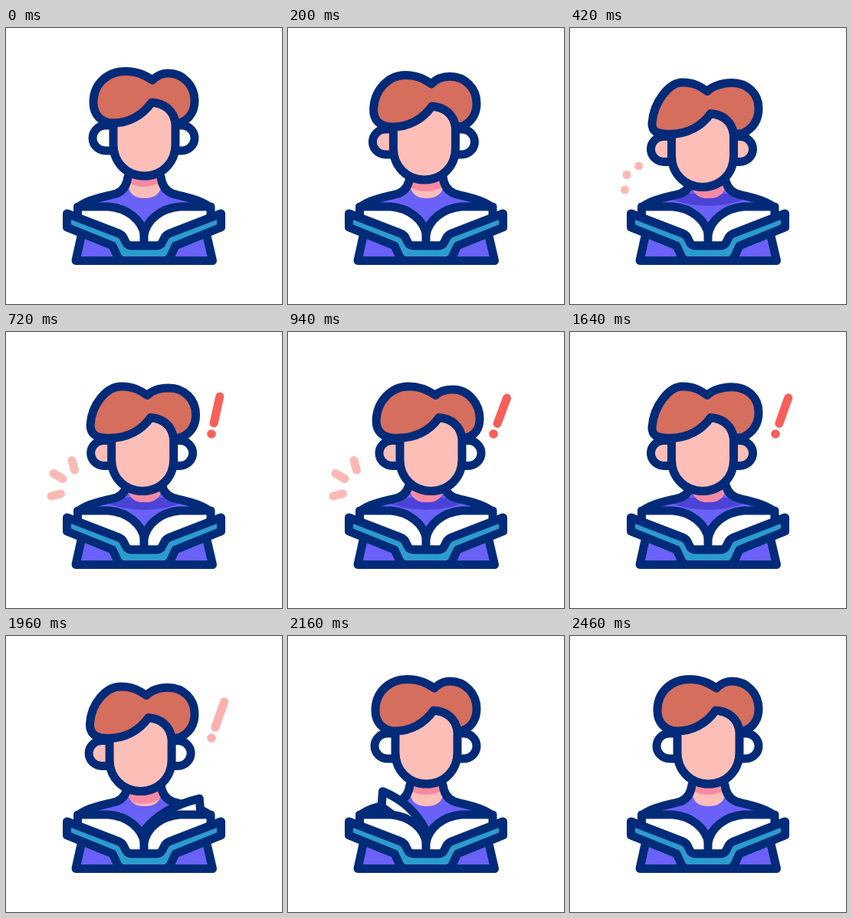
An HTML page that plays this animation: 360x360 px, repeating every 2.92 s.

```html
<!DOCTYPE html>
<html lang="en">
<head>
<meta charset="utf-8">
<title>Reader</title>
<style>
html, body { margin: 0; width: 100%; height: 100%; overflow: hidden; background: #fff; }
svg { display: block; width: 100vw; height: 100vh; }
.ink { stroke: #012b78; stroke-width: 11; stroke-linecap: round; stroke-linejoin: round; }
.line { fill: none; }
.skin { fill: #fdbeb8; }
.mark { stroke: #f85f59; stroke-width: 11; stroke-linecap: round; }
</style>
</head>
<body>
<svg viewBox="0 0 360 360">
  <defs>
    <path id="neckShape" d="M160 186V209Q164 222 180.500 222Q198 222 202 209V186Z"/>
    <path id="faceShape" d="M140 124V152C140 176 158 193 180.500 193C203 193 221 176 221 152V124C219 108 207 98 190 97Z"/>
    <clipPath id="neckClip"><use href="#neckShape"/></clipPath>
  </defs>

  <g id="sparks" stroke="#fbb9b4" stroke-width="11" stroke-linecap="round">
    <line x1="89.500" y1="180"/><line x1="74" y1="191.500"/><line x1="71.500" y1="211"/>
  </g>
  <g id="alert">
    <circle cx="268" cy="133" r="5.800" fill="#f85f59"/>
    <line id="bar" class="mark" x1="268" y1="118.500" x2="268" y2="83"/>
  </g>

  <path fill="#6a61f8" d="M91 303L101 258V230C112 222 130 220 144 216Q157 211 159 194H202Q204 211 217 216C230 220 248 222 259 230V258L269 303Z"/>
  <path id="collar" fill="#4b42d6" d="M124 220L144 216H217L236 220Q210 232 180.500 232Q150 232 124 220Z"/>
  <use href="#neckShape" class="skin"/>
  <g clip-path="url(#neckClip)"><use id="shade" href="#faceShape" fill="#f78aa2"/></g>
  <path class="ink line" d="M98 231C112 222 130 220 144 216Q157 211 159 194M202 194Q204 211 217 216C230 220 248 222 262 231M101 258L91 303.500H269.500L259 258"/>

  <g id="head" class="ink">
    <path id="earL" d="M140 127H130A17 16.500 0 0 0 130 160H141"/>
    <path id="earR" d="M221 127H229A17 16.500 0 0 1 229 160H220"/>
    <use href="#faceShape" class="skin"/>
  </g>
  <path id="hair" class="ink" fill="#d66e5e"/>

  <path id="leaf" class="ink" fill="#fff"/>
  <g id="page" class="ink">
    <path fill="#fff" d="M93.500 233H134C158 235 177 250 180.500 270V284H160L93.500 252Z"/>
  </g>
  <use href="#page" transform="translate(360.500) scale(-1 1)"/>
  <path class="ink" fill="#2c9bce" d="M79.500 242L147 268Q152 270 154 275L156 279Q158 284 164 284H196Q202 284 204 279L206 275Q208 270 213 268L280.500 242V260L221 284L215 297Q212 303.500 206 303.500H154Q148 303.500 145 297L139 284L79.500 260Z"/>
</svg>
<script>
const LOOP = 2920;
const $ = id => document.getElementById(id);
const span = (t, a, b) => Math.min(1, Math.max(0, (t - a) / (b - a)));
const sine = p => (1 - Math.cos(Math.PI * p)) / 2;
const cubic = p => p < .5 ? 4 * p ** 3 : 1 - 4 * (1 - p) ** 3;
const mix = (a, b, p) => a + (b - a) * p;
const reach = [[-3.5, -12.5], [-12, -7], [-12.5, 3]];

// Head: nods down, reads left to right, returns, lifts again.
function pose(t) {
  const down = cubic(span(t, 20, 430)) - cubic(span(t, 1780, 2190));
  const sweep = sine(span(t, 450, 1250)) - sine(span(t, 1250, 1640));
  return { down, x: -7.5 * down + 20 * sweep, y: 14.5 * down };
}

// Hair shifts less than the face at the back and leans as the head turns.
function hairPath({ down, x, y }) {
  const left = .6 * x - 2.5 * down;
  const notch = x - 4.5 * down;
  const right = .3 * x + 2.25 * down;
  const mid = (left + notch) / 2;
  const part = x + down;
  const tilt = .25 * x;
  const drop = .6 * x;
  const lean = (12.5 * down - x) / 20;
  const at = (px, py, dx, dy = 0) => `${(px + dx).toFixed(2)} ${(py + y + dy).toFixed(2)} `;
  return 'M' + at(190, 97, part) +
    'C' + at(178, 114, part) + at(160, 124, x) + at(140, 124, mid) +
    'C' + at(124, 124, left - 5 * lean) + at(114, 113, left, 7 * lean) + at(114, 97, left, 13 * lean) +
    'C' + at(114, 73, left + 2 * lean, 8 * lean) + at(132, 56.5, left + 5 * lean) + at(156, 56.5, mid) +
    'C' + at(172, 56.5, mid) + at(182, 62, notch) + at(191, 68, notch) +
    'C' + at(197, 62, notch) + at(203, 59, (notch + right) / 2, tilt) + at(211, 59, right, tilt) +
    'C' + at(231, 59, right, tilt) + at(246, 75, right, drop) + at(246, 95, right, drop) +
    'C' + at(246, 108, right, drop) + at(240, 118, right, drop / 2) + at(229, 123, (x + right) / 2) +
    'L' + at(221, 124, x) +
    'C' + at(219, 108, x) + at(207, 98, x) + at(190, 97, part) + 'Z';
}

function leafPath(turn) {
  const a = Math.PI * turn;
  const x = 180 + 84 * Math.cos(a), y = 233 - 41 * Math.sin(a);
  const c = 180 + 27 * Math.cos(a), lift = 24 * Math.sin(a);
  return `M180 254Q${c} ${236 - lift} ${x} ${y}L${x + 2 * Math.cos(a)} ${y + 20}Q${c} 250 180 280Z`;
}

function draw(t) {
  const p = pose(t);
  $('head').setAttribute('transform', `translate(${p.x} ${p.y})`);
  $('shade').setAttribute('transform', `translate(${p.x * .3} ${p.y * 1.25 + 14})`);
  $('hair').setAttribute('d', hairPath(p));
  $('earL').setAttribute('fill', t > 20 && t < 2150 ? '#fdbeb8' : '#fff');
  $('earR').setAttribute('fill', p.x < -6 ? '#fdbeb8' : '#fff');
  $('collar').setAttribute('opacity', span(p.down, .65, 1));

  const grow = sine(span(t, 480, 690));
  $('sparks').setAttribute('opacity', span(t, 360, 410) * (1 - span(t, 1060, 1200)));
  [...$('sparks').children].forEach((s, i) => {
    s.setAttribute('x2', +s.getAttribute('x1') + reach[i][0] * grow + .01);
    s.setAttribute('y2', +s.getAttribute('y1') + reach[i][1] * grow);
  });

  const u = Math.max(0, t - 540);
  const swing = 19.5 + 38 * Math.exp(-u / 134) * Math.cos(u * Math.PI / 240);
  $('bar').setAttribute('transform', `rotate(${swing} 268 133)`);
  $('bar').setAttribute('y2', mix(118, 83, sine(span(t, 480, 540))));
  $('alert').setAttribute('opacity', span(t, 470, 530) * (1 - span(t, 1800, 2110)));

  const turn = sine(span(t, 1820, 2340));
  $('leaf').style.display = turn > 0 && turn < 1 ? '' : 'none';
  $('leaf').setAttribute('d', leafPath(turn));
}

const start = performance.now();
function tick(now) {
  draw(Math.max(0, now - start) % LOOP);
  requestAnimationFrame(tick);
}
draw(0);
requestAnimationFrame(tick);
</script>
</body>
</html>
```
